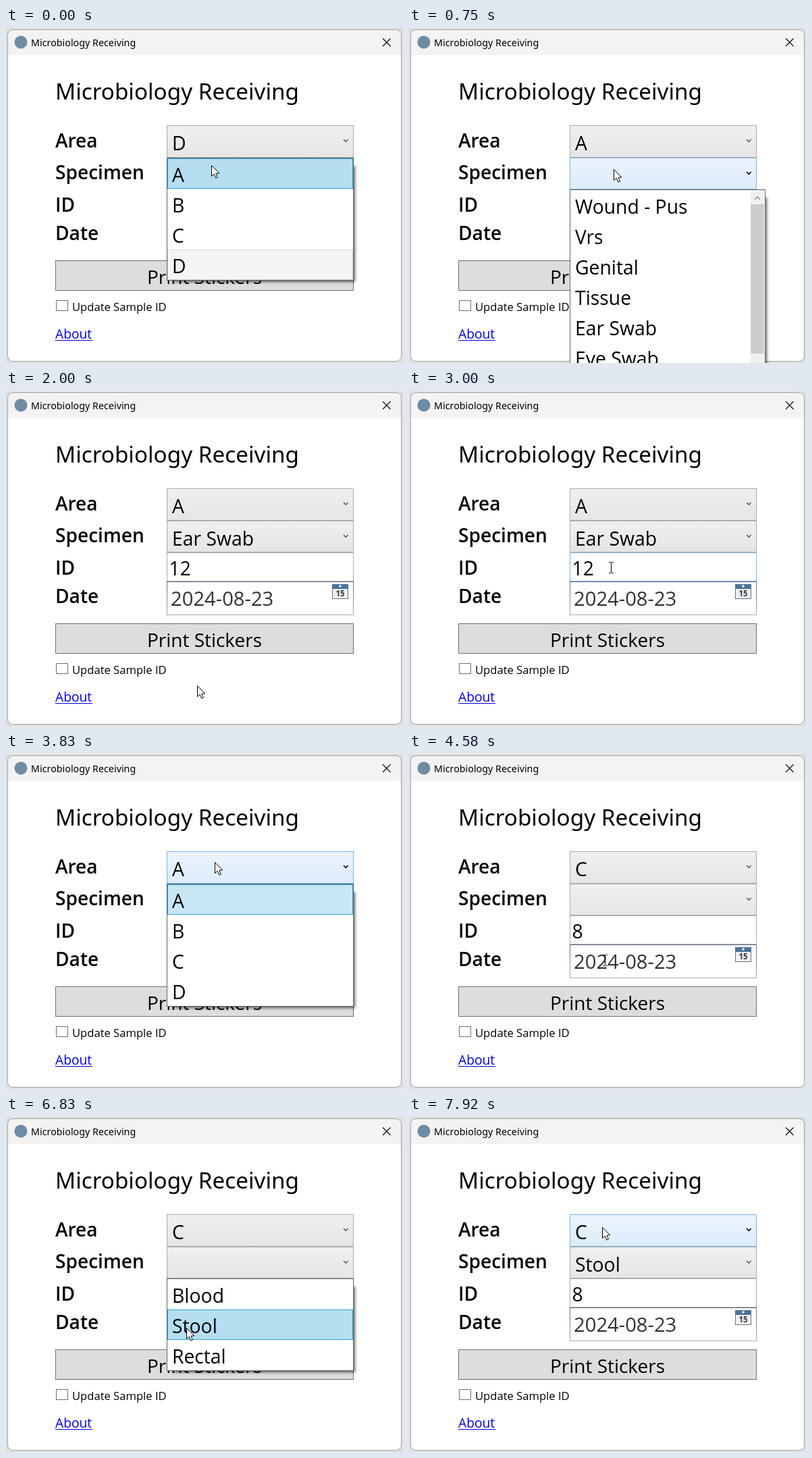
Animation of 588x496 px, one loop 8 s. Source, as an HTML page with a canvas:

```html
<!DOCTYPE html>
<html lang="en">
<head>
<meta charset="utf-8">
<title>Microbiology Receiving</title>
<style>
html, body { margin: 0; width: 100%; height: 100%; overflow: hidden; background: #dedede; }
canvas { display: block; }
</style>
</head>
<body>
<canvas id="stage" width="588" height="496"></canvas>
<script>
const ctx = document.getElementById('stage').getContext('2d');
const LOOP = 8000, FPS = 12;
const OPEN = '"Open Sans", "Noto Sans", sans-serif';
const NOTO = '"Noto Sans", "Open Sans", sans-serif';
const LEFT = 238, RIGHT = 515, ROW = 45;

// Pointer positions: time, x, y
const POINTER = [
  [0, 304, 203], [420, 303, 209], [750, 303, 209], [1080, 296, 275], [1250, 296, 275],
  [1417, 286, 416], [1750, 283, 436], [2000, 283, 436], [3580, 309, 160], [3917, 309, 160],
  [4420, 290, 305], [4583, 290, 305], [5500, 272, 249], [5833, 268, 215], [6083, 267, 217],
  [6500, 267, 265], [6833, 267, 312], [6917, 267, 312], [7750, 286, 163], [LOOP, 286, 163]
];

const AREAS = ['A', 'B', 'C', 'D'];
const SPECIMENS_A = ['Wound - Pus', 'Vrs', 'Genital', 'Tissue', 'Ear Swab', 'Eye Swab'];
const SPECIMENS_C = ['Blood', 'Stool', 'Rectal'];

const POPUPS = [
  { from: 0, to: 80, top: 192, items: AREAS, selected: 3 },
  { from: 750, to: 2000, top: 239, items: SPECIMENS_A, selected: -1, scrolls: true },
  { from: 3660, to: 4580, top: 192, items: AREAS, selected: 0 },
  { from: 5910, to: 6910, top: 239, items: SPECIMENS_C, selected: -1 }
];

function pointerAt(t) {
  const i = Math.max(1, POINTER.findIndex(key => key[0] >= t));
  const [t0, x0, y0] = POINTER[i - 1], [t1, x1, y1] = POINTER[i];
  const k = (t - t0) / (t1 - t0);
  return { x: Math.round(x0 + (x1 - x0) * k), y: Math.round(y0 + (y1 - y0) * k) };
}

function text(str, x, y, size, { color = '#000', weight = 400, family = OPEN, align = 'left' } = {}) {
  ctx.font = `${weight} ${size}px ${family}`;
  ctx.fillStyle = color;
  ctx.textAlign = align;
  ctx.fillText(str, x, y);
}

function box(x, y, w, h, fill, border) {
  ctx.fillStyle = fill;
  ctx.fillRect(x, y, w, h);
  if (!border) return;
  ctx.strokeStyle = border;
  ctx.lineWidth = 1;
  ctx.strokeRect(x + .5, y + .5, w - 1, h - 1);
}

function line(color, width, ...points) {
  ctx.strokeStyle = color;
  ctx.lineWidth = width;
  ctx.beginPath();
  points.forEach(([x, y]) => ctx.lineTo(x, y));
  ctx.stroke();
}

function verticalGradient(y, h, ...colors) {
  const gradient = ctx.createLinearGradient(0, y, 0, y + h);
  colors.forEach((color, i) => gradient.addColorStop(i / (colors.length - 1), color));
  return gradient;
}

function windowFrame() {
  ctx.fillStyle = '#dedede';
  ctx.fillRect(0, 0, 588, 496);
  ctx.save();
  ctx.beginPath();
  ctx.roundRect(2.5, 2.5, 583, 491, 8);
  ctx.clip();
  box(2, 2, 584, 492, '#fff');
  box(2, 2, 584, 38, '#f3f3f3');
  ctx.restore();
  ctx.strokeStyle = '#a3a3a3';
  ctx.lineWidth = 1;
  ctx.stroke();

  ctx.fillStyle = '#6f8ca3';
  ctx.beginPath();
  ctx.arc(22, 21, 9.5, 0, 7);
  ctx.fill();
  text('Microbiology Receiving', 37, 27, 14.3, { family: NOTO });
  line('#111', 1.2, [558, 15.5], [569.5, 27]);
  line('#111', 1.2, [569.5, 15.5], [558, 27]);
}

function combo(y, h, value, hover) {
  const fill = hover ? verticalGradient(y, h, '#ecf4fc', '#dcecfc') : verticalGradient(y, h, '#f0f0f0', '#e5e5e5');
  box(LEFT, y, RIGHT - LEFT, h, fill, hover ? '#7eb4ea' : '#acacac');
  line(hover ? '#000' : '#606060', 1.6, [500, y + 21], [503.3, y + 24.3], [506.6, y + 21]);
  text(value, 246, y + 37, 28.3);
}

function calendarIcon() {
  box(483, 286, 24, 22, '#eef0f3', '#66727f');
  box(483, 286, 24, 7, '#4a7399');
  ctx.fillStyle = '#fff';
  ctx.beginPath();
  ctx.arc(495, 289, 1.8, 0, 7);
  ctx.fill();
  text('15', 495, 304, 11.5, { color: '#333', weight: 700, align: 'center' });
}

function form(state, over) {
  text('Microbiology Receiving', 73, 106, 33.25, { family: NOTO });
  [['Area', 177], ['Specimen', 224], ['ID', 272], ['Date', 314]]
    .forEach(([label, y]) => text(label, 73, y, 28.1, { weight: 600 }));

  combo(144, 48, state.area, over(LEFT, 144, RIGHT, 192));
  combo(192, 47, state.specimen, over(LEFT, 192, RIGHT, 239));
  box(LEFT, 239, 277, 43, '#fff', over(LEFT, 239, RIGHT, 282) ? '#7eb4ea' : '#abadb3');
  text(state.id, 241.5, 273, 28.3);
  box(LEFT, 282, 277, 50, '#fff', verticalGradient(282, 50, '#5f6d86', '#7f8ca3', '#a3aebf'));
  text('2024-08-23', 244, 318, 29.2, { color: '#333' });
  calendarIcon();

  const hot = over(73, 344, RIGHT, 389);
  box(73, 344, 442, 45, hot ? '#bee6fd' : '#ddd', hot ? '#3c7fb1' : '#707070');
  text('Print Stickers', 294, 379, 28, { align: 'center' });

  box(74, 403, 18, 16, '#fff', '#707070');
  text('Update Sample ID', 98, 419, 16.6);
  text('About', 73, 460, 19.2, { color: '#0000d8' });
  box(73, 462, 55, 1, '#0000d8');
}

function scrollbar(top) {
  box(506, top + 1, 20, 300, '#f0f0f0');
  box(506, top + 22, 20, 221, '#cdcdcd');
  line('#8a8a8a', 1.4, [512, top + 15], [516, top + 11], [520, top + 15]);
}

function popup({ top, items, selected, scrolls }, pointer) {
  const width = scrolls ? 290 : 277;
  const height = scrolls ? 300 : items.length * ROW + 2;
  ctx.save();
  ctx.shadowColor = 'rgba(0,0,0,.6)';
  ctx.shadowBlur = 4;
  ctx.shadowOffsetX = ctx.shadowOffsetY = 2;
  box(LEFT + 6, top + 10, width - 6, height - 10, '#fff');
  ctx.restore();
  box(LEFT, top, width, height, '#fff', '#646464');

  const hovered = Math.floor((pointer.y - top - 1) / ROW);
  const rowWidth = scrolls ? 267 : width - 2;
  items.forEach((item, i) => {
    const y = top + 1 + i * ROW;
    if (i === hovered) box(LEFT + 1, y, rowWidth, ROW, '#b5def1', '#2f9fd4');
    else if (i === selected && hovered < 0) box(LEFT + 1, y, rowWidth, ROW, '#c8e7f5', '#2f9fd4');
    else if (i === selected) box(LEFT + 1, y, rowWidth, ROW, '#f4f4f4', '#dadada');
    text(item, 246, y + 35, 28.3);
  });
  if (scrolls) scrollbar(top);
}

function arrowPointer({ x, y }) {
  ctx.beginPath();
  [[0, 0], [0, 16], [3.7, 12.7], [6.3, 18.6], [8.9, 17.5], [6.4, 11.7], [11.3, 11.5]]
    .forEach(([dx, dy]) => ctx.lineTo(x + .5 + dx, y + .5 + dy));
  ctx.closePath();
  ctx.fillStyle = '#fff';
  ctx.fill();
  ctx.strokeStyle = '#000';
  ctx.lineWidth = 1;
  ctx.stroke();
}

function textPointer({ x, y }) {
  line('#000', 1, [x + .5, y - 7], [x + .5, y + 8]);
  for (const edge of [y - 7.5, y + 8.5]) {
    line('#000', 1, [x - 3, edge], [x, edge]);
    line('#000', 1, [x + 1, edge], [x + 4, edge]);
  }
}

function stateAt(t) {
  const onC = t >= 4580;
  return {
    area: t < 80 ? 'D' : onC ? 'C' : 'A',
    specimen: t >= 6910 ? 'Stool' : t >= 2000 && !onC ? 'Ear Swab' : '',
    id: onC ? '8' : '12'
  };
}

function draw(now) {
  const t = Math.floor((now % LOOP + 4) * FPS / 1000) * 1000 / FPS % LOOP;
  const pointer = pointerAt(t);
  const list = POPUPS.find(p => t >= p.from && t < p.to);
  const overList = list && pointer.y > list.top;
  const over = (x0, y0, x1, y1) => !overList &&
    pointer.x >= x0 && pointer.x < x1 && pointer.y >= y0 && pointer.y < y1;

  windowFrame();
  form(stateAt(t), over);
  if (list) popup(list, pointer);
  if (over(LEFT, 239, 480, 332)) textPointer(pointer);
  else arrowPointer(pointer);
}

const start = performance.now();
function tick() {
  draw(performance.now() - start);
  requestAnimationFrame(tick);
}
tick();
</script>
</body>
</html>
```
